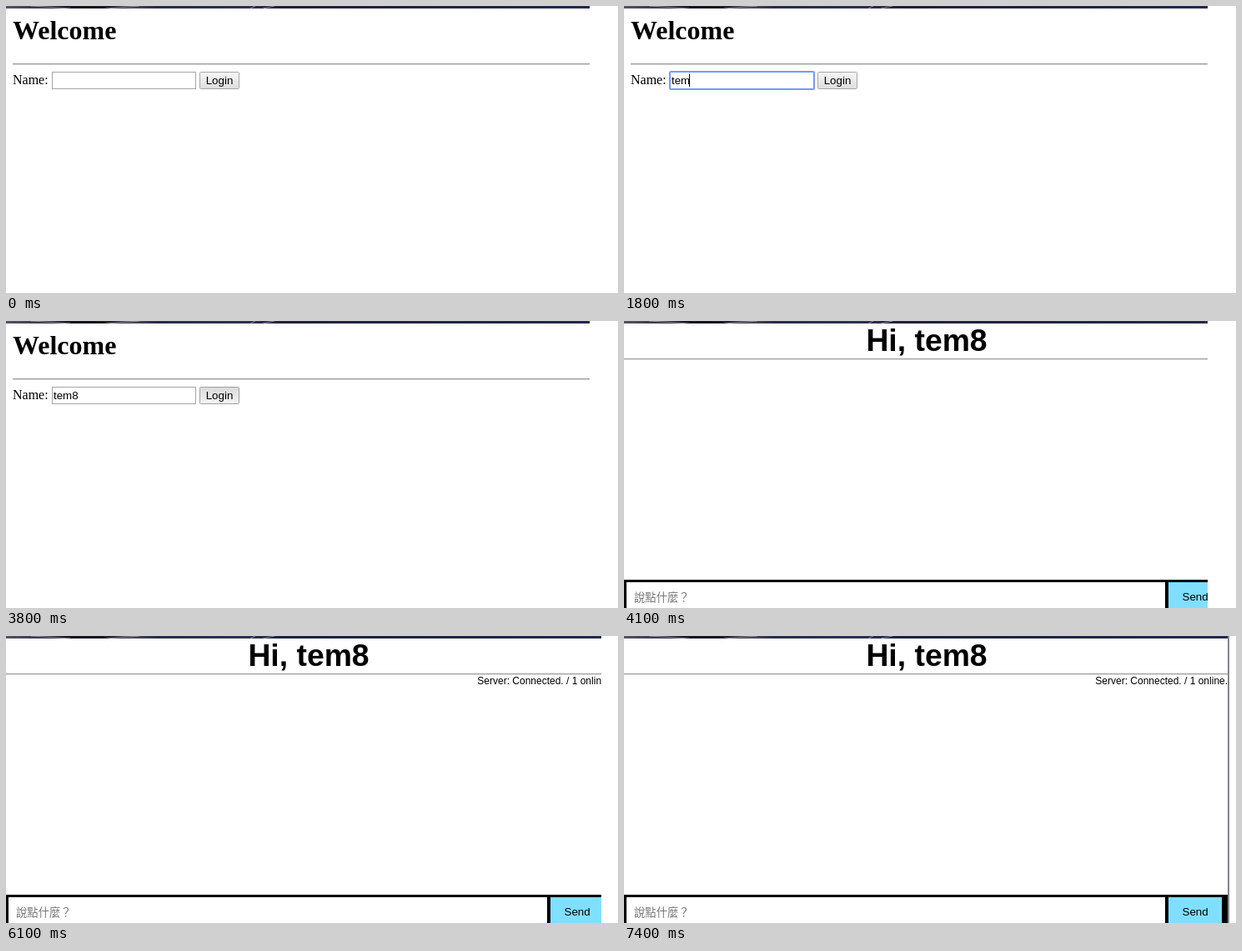
An HTML page for the animation above (8000 ms loop, 734 by 345 pixels).

```html
<!DOCTYPE html>
<html lang="en">
<head>
<meta charset="utf-8">
<title>Login to chat</title>
<style>
html, body { margin: 0; width: 734px; height: 345px; overflow: hidden; background: #fff; }
svg { display: block; }
text { white-space: pre; }
.serif { font-family: "Liberation Serif", "Times New Roman", serif; }
.ui { font: 13.333px "Liberation Sans", Arial, sans-serif; }
.list { font: 13.333px "Open Sans", "Noto Sans", sans-serif; fill: #333; }
.hint { font: 13.333px "Noto Sans CJK TC", "Noto Sans CJK", "Noto Sans CJK JP", sans-serif; fill: #757575; }
#menu rect { filter: drop-shadow(0 1px 1.5px rgba(0, 0, 0, .35)); }
</style>
</head>
<body>
<svg width="734" height="345" viewBox="0 0 734 345">
  <defs>
    <linearGradient id="theme">
      <stop offset="0" stop-color="#555263"/>
      <stop offset=".06" stop-color="#38364a"/>
      <stop offset=".11" stop-color="#12111c"/>
      <stop offset=".16" stop-color="#17161f"/>
      <stop offset=".21" stop-color="#4a4858"/>
      <stop offset=".25" stop-color="#292c48"/>
      <stop offset=".4" stop-color="#2d3152"/>
      <stop offset=".46" stop-color="#1f2138"/>
      <stop offset="1" stop-color="#24284a"/>
    </linearGradient>
    <linearGradient id="face" x2="0" y2="1">
      <stop id="faceTop" offset="0"/>
      <stop id="faceEnd" offset="1"/>
    </linearGradient>
  </defs>

  <rect width="734" height="345" fill="#fff"/>
  <rect width="724" height="3" fill="url(#theme)"/>
  <path d="M30 0l48 3M120 3l40-3M293 3l6-3M308 3l14-3" stroke="#8a8795" fill="none"/>

  <g id="login">
    <text class="serif" x="8" y="40" font-size="32" font-weight="bold">Welcome</text>
    <path d="M8 69.5H716" stroke="#9a9a9a"/>
    <path d="M8 70.5H716" stroke="#d8d8d8"/>
    <text class="serif" x="8" y="94" font-size="16">Name:</text>
    <g id="menu">
      <rect x="54" y="98" width="192" height="236" rx="4" fill="#fff"/>
    </g>
    <rect x="55.5" y="79.5" width="172" height="20" fill="#fff" stroke="#a5a5a5"/>
    <rect id="ring" x="55" y="79" width="173" height="21" rx="1.5" fill="none" stroke="#6a9ff5" stroke-width="2"/>
    <text id="field" class="ui" x="57" y="94"></text>
    <rect id="caret" y="82" width="1" height="15"/>
    <rect id="button" x="232.5" y="79.5" width="47" height="20" rx="1" fill="url(#face)"/>
    <text class="ui" x="239.7" y="94">Login</text>
  </g>

  <g id="chat">
    <text class="ui" id="hello" x="290.4" y="36" style="font-size:37.33px;font-weight:bold"></text>
    <path d="M0 45.5H724" stroke="#9a9a9a"/>
    <path d="M0 46.5H724" stroke="#e4e4e4"/>
    <text class="ui" id="status" x="565.3" y="58" style="font-size:12px">Server: Connected. / 1 online.</text>
    <rect y="311" width="724" height="34"/>
    <rect x="3" y="314" width="646" height="31" fill="#fff"/>
    <rect x="653" y="314" width="64" height="31" fill="#80dfff"/>
    <text class="hint" x="12" y="337">說點什麼？</text>
    <text class="ui" x="669.5" y="336">Send</text>
  </g>

  <rect x="724" width="2" height="345" fill="#85858f"/>
  <rect x="726" width="8" height="345" fill="#e6e6ea"/>
  <rect id="cover" width="734" height="345" fill="#fff"/>
</svg>
<script>
const LOOP = 8000, NAME = "tem8";
const $ = id => document.getElementById(id);
const show = (id, on) => $(id).setAttribute("visibility", on ? "inherit" : "hidden");

// Value of the last [time, value] step that has begun.
const stepAt = (steps, t) => steps.filter(([start]) => start <= t).pop()[1];

const typed = [[0, 0], [800, 1], [1400, 2], [1800, 3], [2500, 4]];
const caretX = [57, 59, 67, 78, 86];
const caretOn = [[0, 0], [700, 1], [1300, 0], [1400, 1], [2300, 0], [2500, 1], [3000, 0], [3400, 1], [3800, 0]];
const buttonLook = [
  [0, ["#f6f6f6", "#dddddd", "#a6a6a6"]],
  [2600, ["#f8f8f8", "#e2e2e2", "#939393"]],
  [3800, ["#dadada", "#f4f4f4", "#a0a0a0"]]
];
const viewWidth = [
  [0, 700], [6100, 714], [6200, 715],
  [6400, 718], [6500, 722], [6600, 726], [6700, 729], [6800, 732], [6900, 734],
  [7100, 732], [7200, 730], [7300, 728], [7400, 726]
];

["12312", "asd", "asdf", "123", "11111", "42.3"].forEach((word, i) => {
  const item = document.createElementNS("http://www.w3.org/2000/svg", "text");
  item.setAttribute("class", "list");
  item.setAttribute("x", 66);
  item.setAttribute("y", 133 + 36 * i);
  item.textContent = word;
  $("menu").append(item);
});
$("hello").textContent = "Hi, " + NAME;

function draw(t) {
  const count = stepAt(typed, t);
  const [top, end, edge] = stepAt(buttonLook, t);
  show("login", t < 4100);
  show("chat", t >= 4100);
  show("status", t >= 4200);
  show("menu", t >= 700 && t < 800);
  show("ring", t >= 700 && t < 3800);
  show("caret", stepAt(caretOn, t));
  $("caret").setAttribute("x", caretX[count]);
  $("field").textContent = NAME.slice(0, count);
  $("faceTop").setAttribute("stop-color", top);
  $("faceEnd").setAttribute("stop-color", end);
  $("button").setAttribute("stroke", edge);
  $("cover").setAttribute("x", stepAt(viewWidth, t));
}

// "inherit" keeps children hidden together with their page.
const begin = performance.now();
function tick() {
  draw((performance.now() - begin) % LOOP);
  requestAnimationFrame(tick);
}
tick();
</script>
</body>
</html>
```
